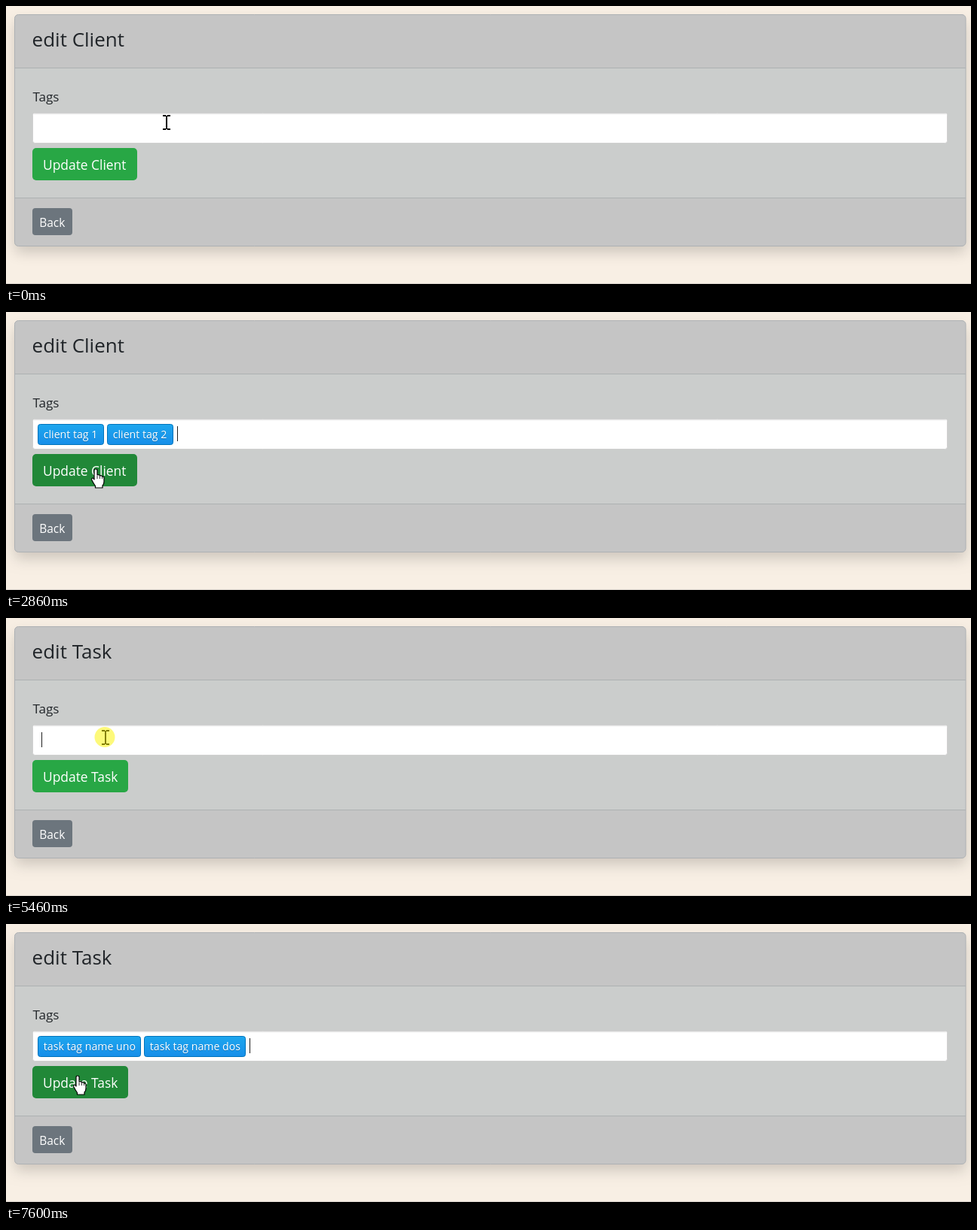
An HTML page with a canvas for the animation above (8150 ms loop, 1280x370 px).

```html
<!DOCTYPE html>
<html lang="en">
<head>
<meta charset="utf-8">
<title>Tag editor</title>
<style>
  html, body { margin: 0; width: 100%; height: 100%; overflow: hidden; background: #f8efe4; }
  canvas { display: block; width: 1280px; height: 370px; }
</style>
</head>
<body>
<canvas id="stage" width="1280" height="370"></canvas>
<script>
const ctx = document.getElementById('stage').getContext('2d');
const LOOP = 8150;
const FONT = '"Open Sans", "Noto Sans", sans-serif';

const PAGES = {
  Client: { button: 139, tags: [['client tag 1', 88], ['client tag 2', 88]] },
  Task: { button: 127, tags: [['task tag name uno', 137], ['task tag name dos', 135]] }
};

// Each step changes only the listed parts of the state.
const STEPS = [
  [0, { page: 'Client', chips: 0, menu: false, caret: false, hover: false, hand: false, click: false, x: 213, y: 155 }],
  [360, { click: true, caret: true }],
  [460, { menu: true }],
  [540, { click: false, x: 192, y: 163 }],
  [640, { x: 152, y: 180 }],
  [740, { x: 117, y: 194 }],
  [820, { x: 103, y: 199 }],
  [920, { click: true, caret: false }],
  [1000, { click: false, chips: 1 }],
  [1380, { click: true, caret: true }],
  [1460, { chips: 2, menu: false, hand: true, x: 102 }],
  [1560, { hover: true }],
  [1640, { click: false }],
  [1920, { caret: false }],
  [2300, { x: 103, y: 200 }],
  [2380, { x: 106, y: 202 }],
  [2480, { x: 110, y: 204, caret: true }],
  [2560, { x: 114, y: 206 }],
  [2660, { x: 117, y: 208 }],
  [2740, { x: 119, y: 209 }],
  [2920, { chips: 1, menu: true, hover: false }],
  [3040, { hand: false }],
  [3500, { caret: false, y: 211 }],
  [3600, { y: 213 }],
  [3970, { click: true }],
  [4070, { chips: 2, menu: false, hand: true, caret: true, y: 214 }],
  [4150, { hover: true }],
  [4250, { click: false }],
  [4530, { caret: false }],
  [5000, { page: 'Task', chips: 0, hover: false }],
  [5100, { x: 122, y: 204 }],
  [5180, { x: 126, y: 188, hand: false }],
  [5280, { x: 130, y: 170 }],
  [5360, { x: 132, y: 159 }],
  [5460, { click: true, caret: true }],
  [5540, { menu: true }],
  [5640, { click: false, x: 114, y: 183 }],
  [5740, { x: 98, y: 202 }],
  [5920, { click: true, caret: false }],
  [6020, { chips: 1 }],
  [6120, { click: false }],
  [6380, { x: 97, y: 203 }],
  [6480, { caret: true }],
  [6940, { click: true }],
  [7040, { chips: 2, menu: false, hand: true, caret: false }],
  [7140, { hover: true, click: false }],
  [7320, { x: 95, y: 202 }],
  [7600, { caret: true }]
];

function stateAt(time) {
  const state = {};
  for (const [start, change] of STEPS) {
    if (start > time) break;
    Object.assign(state, change);
  }
  return state;
}

function rect(x, y, w, h, color) {
  ctx.fillStyle = color;
  ctx.fillRect(x, y, w, h);
}

function box(x, y, w, h, radius, fill, stroke) {
  ctx.beginPath();
  ctx.roundRect(x, y, w, h, radius);
  if (fill) {
    ctx.fillStyle = fill;
    ctx.fill();
  }
  if (stroke) {
    ctx.strokeStyle = stroke;
    ctx.lineWidth = 1;
    ctx.stroke();
  }
}

function text(str, x, y, size, color) {
  ctx.font = `${size}px ${FONT}`;
  ctx.fillStyle = color;
  ctx.fillText(str, x, y);
}

function withShadow(color, blur, dy, draw) {
  ctx.save();
  ctx.shadowColor = color;
  ctx.shadowBlur = blur;
  ctx.shadowOffsetY = dy;
  draw();
  ctx.restore();
}

function drawCard(page) {
  rect(0, 0, 1280, 370, '#f8efe4');
  rect(0, 369, 1280, 1, '#d8d2cb');
  withShadow('rgba(0,0,0,.17)', 18, 9, () => box(11.5, 11.5, 1261.5, 308, 5, '#c5c5c5'));
  rect(12, 82, 1261, 173, '#cbcdcc');
  rect(12, 82, 1261, 1, '#adb1b2');
  rect(12, 255, 1261, 1, '#adb1b2');
  box(11.5, 11.5, 1261.5, 308, 5, null, '#adb1b4');
  text('edit ' + page, 34.6, 54, 26, '#212529');
  text('Tags', 35.4, 127, 17.1, '#212529');
  box(35, 269, 53, 36, 4, '#6c757d');
  text('Back', 44.2, 294, 15.5, '#fff');
}

function drawField() {
  box(35.5, 142.5, 1213, 40, 3, '#fff', '#d0d0d0');
  rect(36, 143, 1212, 1, '#ececec');
  rect(36, 144, 1212, 1, '#f8f8f8');
}

function drawChips(tags) {
  let x = 42;
  for (const [label, width] of tags) {
    const fill = ctx.createLinearGradient(0, 149, 0, 177);
    fill.addColorStop(0, '#1da7ee');
    fill.addColorStop(1, '#178ee9');
    box(x + .5, 149.5, width - 1, 27, 3, fill, '#0073bb');
    withShadow('rgba(0,51,83,.3)', 0, 1, () => text(label, x + 7.8, 168, 14.15, '#fff'));
    x += width + 4;
  }
  return x;
}

function drawButton(page, width, hover) {
  box(35, 189, width, 43, 5, hover ? '#218838' : '#28a745');
  text('Update ' + page, 49, 218, 17.4, '#fff');
}

function drawMenu(tags) {
  const height = tags.length * 32 + 1;
  withShadow('rgba(0,0,0,.14)', 3, 1, () => box(36, 181, 1212.5, height + 1, [0, 0, 3, 3], '#d0d0d0'));
  box(36.5, 181, 1211.5, height, [0, 0, 3, 3], '#fff');
  rect(37, 181, 1211, 32, '#f5fafd');
  rect(37, 181, 1211, 1, '#dfe5e8');
  tags.forEach(([label], i) =>
    text(label, 45.2, 203 + i * 32, 14.15, i ? '#303030' : '#495c68'));
}

const HAND = new Path2D(
  'M-2 2Q-2 0 0 0Q2 0 2 2V8Q5 7 5.5 9Q8 8 8.5 10Q11 9.5 11 12V17' +
  'Q11 20 9 22V25H-.5V22.5Q-3 19 -5 15Q-6 12 -4 12Q-3 12 -2 14Z');

function drawCursor({ x, y, hand, click }) {
  ctx.save();
  ctx.translate(x, y);
  if (hand) {
    ctx.strokeStyle = '#000';
    ctx.lineWidth = 1.2;
    ctx.lineJoin = 'round';
    ctx.fillStyle = '#fff';
    ctx.fill(HAND);
    ctx.stroke(HAND);
    ctx.beginPath();
    for (const fx of [2, 5.5, 8.5]) {
      ctx.moveTo(fx, 9);
      ctx.lineTo(fx, 13);
    }
    ctx.lineWidth = .8;
    ctx.stroke();
  } else {
    rect(-1, -9, 2, 18, '#000');
    for (const sy of [-10, 8]) {
      rect(-5, sy, 4, 2, '#000');
      rect(1, sy, 4, 2, '#000');
    }
  }
  if (click) {
    ctx.beginPath();
    ctx.arc(-1, -.5, 13.5, 0, Math.PI * 2);
    ctx.fillStyle = 'rgba(252,244,0,.52)';
    ctx.fill();
  }
  ctx.restore();
}

function draw(time) {
  const state = stateAt(time);
  const { button, tags } = PAGES[state.page];
  drawCard(state.page);
  drawField();
  const end = drawChips(tags.slice(0, state.chips));
  drawButton(state.page, button, state.hover);
  if (state.menu) drawMenu(tags.slice(state.chips));
  if (state.caret) rect(state.chips ? end + 1 : 47, 152, 1, 20, '#202020');
  drawCursor(state);
}

const began = performance.now();
function tick() {
  draw((performance.now() - began) % LOOP);
  requestAnimationFrame(tick);
}
tick();
</script>
</body>
</html>
```
